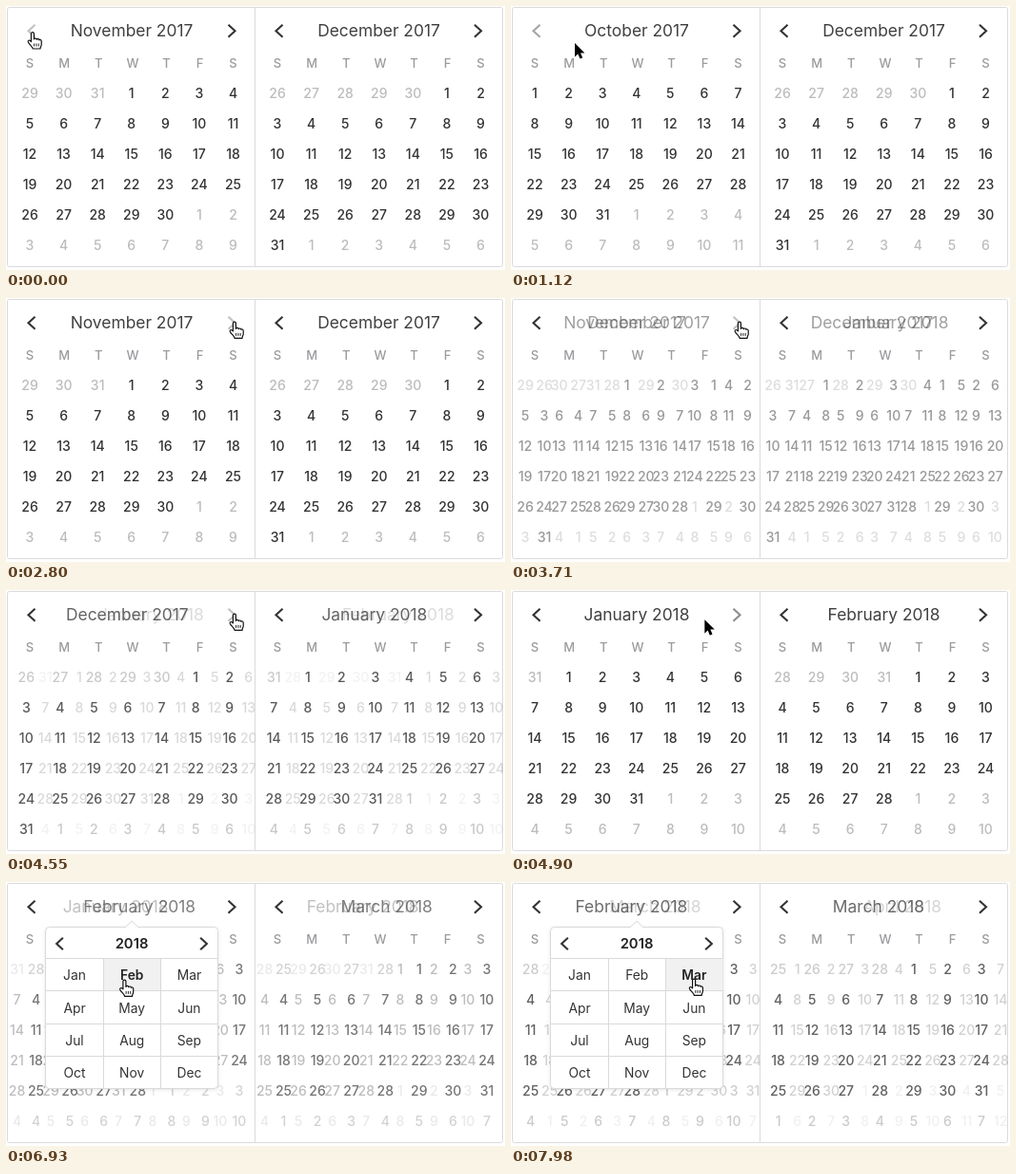
Write an HTML page with a canvas that moves like this. It is 524x278 px and loops after 8 s.

```html
<!DOCTYPE html>
<html lang="en">
<head>
<meta charset="utf-8">
<title>Calendar</title>
<style>
html, body { margin: 0; width: 100%; height: 100%; overflow: hidden; background: #fff; }
canvas { display: block; width: 524px; height: 278px; }
</style>
</head>
<body>
<canvas id="stage"></canvas>
<script>
const W = 524, H = 278, LOOP = 8000, STEP = 70, SLIDE = 360, COL = 35.58;
const INK = '#333', FADED = '#bcbcbc', LINE = '#dadada';
const MONTHS = ['January', 'February', 'March', 'April', 'May', 'June', 'July',
  'August', 'September', 'October', 'November', 'December'];
const PANES = [
  { x: 1, right: 261.5, first: 25, title: 132, prev: 27, next: 237 },
  { x: 262.5, right: 522, first: 285, title: 391.5, prev: 287, next: 495.5 }
];

// Months count from January 2017.
const START = [10, 11];
const SLIDES = [
  { at: 590, months: [9, 11], dir: -1 },
  { at: 2315, months: [10, 11], dir: 1 },
  { at: 3530, months: [11, 12], dir: 1 },
  { at: 4440, months: [12, 13], dir: 1 },
  { at: 6715, months: [13, 14], dir: 1 },
  { at: 7860, months: [14, 15], dir: 1 }
];
const CLICKS = [[490, 630], [2170, 2240], [3290, 3360], [4200, 4340], [6510, 6580], [7630, 7700]];
const POINTER = [
  [0, 28, 28], [980, 28, 28], [1120, 67, 39], [1400, 157, 45], [1700, 222, 34], [1960, 240, 25.4],
  [4760, 240, 25.4], [4970, 185, 34], [5180, 136, 31], [5630, 136, 31], [5950, 132, 62],
  [6300, 124.5, 103.4], [7000, 124.5, 103.4], [7120, 134, 104], [7370, 184, 103.5], [7490, 192.2, 102.4]
];

const HAND = new Path2D('M-1.6 9.5V1.2a1.5 1.5 0 0 1 3 0V7c.2-1.3 2.8-1.3 2.9.3c.4-1.1 2.5-.9 2.6.6' +
  'c.5-.8 2.3-.5 2.3 1.2V12.5c0 1.5-1.2 2.5-1.2 4.5H.2c0-1.6-3.9-4.8-4.9-7c-.7-1.7 1.2-2.4 2.1-1.4z');
const CREASES = new Path2D('M1.6 11.5v3M3.9 11.5v3M6.2 11.5v3');
const ARROW = new Path2D('M0 0V14.5L3.3 11.4L5.5 16.6L8.2 15.4L6 10.4H10.4Z');

const canvas = document.getElementById('stage');
const ctx = canvas.getContext('2d');
const ratio = window.devicePixelRatio || 1;
canvas.width = W * ratio;
canvas.height = H * ratio;

const ramp = (t, from, to) => Math.min(1, Math.max(0, (t - from) / (to - from)));
const ease = p => p < .5 ? 2 * p * p : 1 - 2 * (1 - p) * (1 - p);

function text(str, x, y, size, weight, color) {
  ctx.font = `${weight} ${size}px Inter, "Open Sans", sans-serif`;
  ctx.textAlign = 'center';
  ctx.fillStyle = color;
  ctx.fillText(str, x, y + size * .364);
}

function line(x1, y1, x2, y2) {
  ctx.beginPath();
  ctx.moveTo(x1, y1);
  ctx.lineTo(x2, y2);
  ctx.strokeStyle = LINE;
  ctx.lineWidth = 1;
  ctx.stroke();
}

function chevron(x, y, dir, alpha = 1, size = 6.5) {
  const w = size * .54 * dir;
  ctx.save();
  ctx.globalAlpha *= alpha;
  ctx.beginPath();
  ctx.moveTo(x - w, y - size);
  ctx.lineTo(x + w, y);
  ctx.lineTo(x - w, y + size);
  ctx.strokeStyle = INK;
  ctx.lineWidth = 2.1;
  ctx.stroke();
  ctx.restore();
}

function month(pane, index, shift, alpha) {
  const year = 2017 + Math.floor(index / 12), m = index % 12;
  const lead = new Date(year, m, 1).getDay();
  ctx.save();
  ctx.globalAlpha = alpha;
  text(`${MONTHS[m]} ${year}`, pane.title + shift * 25, 26, 17.4, 400, '#404040');
  for (let i = 0; i < 42; i++) {
    const day = new Date(year, m, 1 - lead + i);
    text(day.getDate(), pane.first + (i % 7) * COL + shift * 20, 91.5 + Math.floor(i / 7) * 32,
      14, 500, day.getMonth() === m ? INK : FADED);
  }
  ctx.restore();
}

// The wide M and W push the middle weekday labels slightly right of the day columns.
function weekdays(pane) {
  [...'SMTWTFS'].forEach((d, i) =>
    text(d, pane.first + i * COL + 1.3 * Math.sin(Math.PI * i / 6), 60, 13, 500, '#9b9b9f'));
}

function drawPane(side, t) {
  const pane = PANES[side];
  let from = START[side], to = from, p = 1, dir = 1;
  for (const slide of SLIDES) {
    if (t < slide.at) break;
    from = to;
    to = slide.months[side];
    dir = slide.dir;
    p = ease(ramp(t, slide.at, slide.at + SLIDE));
  }
  ctx.save();
  ctx.beginPath();
  ctx.rect(pane.x, 1, pane.right - pane.x, 273);
  ctx.clip();
  if (from === to || p === 1) {
    month(pane, to, 0, 1);
  } else {
    month(pane, from, -dir * p, 1 - p);
    month(pane, to, dir * (1 - p), p);
  }
  weekdays(pane);
  const prevHover = side ? 0 : 1 - ramp(t, 1060, 1360);
  const nextHover = side ? 0 : ramp(t, 1750, 1960) - ramp(t, 4790, 5090);
  chevron(pane.prev, 26.3, -1, 1 - .7 * prevHover);
  chevron(pane.next, 26.3, 1, 1 - .7 * nextHover);
  ctx.restore();
}

function popover(t) {
  const alpha = ramp(t, 5270, 5460);
  if (!alpha) return;
  const selected = t < SLIDES[4].at ? 0 : t < SLIDES[5].at ? 1 : 2;
  const cols = [41.5, 102.5, 162.5, 222.5], rows = [80.5, 114.5, 149.5, 183.5, 217.5];
  ctx.save();
  ctx.globalAlpha = alpha;
  ctx.beginPath();
  ctx.roundRect(41.5, 47.5, 181, 170, 4);
  ctx.save();
  ctx.shadowColor = 'rgba(0,0,0,.12)';
  ctx.shadowBlur = 4 * ratio;
  ctx.shadowOffsetY = ratio;
  ctx.fillStyle = '#fff';
  ctx.fill();
  ctx.restore();
  ctx.strokeStyle = LINE;
  ctx.lineWidth = 1;
  ctx.stroke();
  ctx.beginPath();
  ctx.moveTo(124.5, 48.2);
  ctx.lineTo(132, 41);
  ctx.lineTo(139.5, 48.2);
  ctx.fillStyle = '#fff';
  ctx.fill();
  ctx.stroke();

  chevron(56.5, 65, -1, 1, 6.2);
  chevron(207.5, 65, 1, 1, 6.2);
  text('2018', 132, 65, 14.8, 600, '#222');
  ctx.fillStyle = '#f1f1f1';
  ctx.fillRect(cols[selected], rows[0], cols[selected + 1] - cols[selected], rows[1] - rows[0]);
  rows.slice(0, 4).forEach(y => line(41.5, y, 222.5, y));
  cols.slice(1, 3).forEach(x => line(x, 80.5, x, 217.5));
  MONTHS.forEach((name, i) => text(name.slice(0, 3), 72 + (i % 3) * 60.2, 98.3 + Math.floor(i / 3) * 34.2,
    13.8, i === selected ? 600 : 400, i === selected ? '#222' : INK));
  ctx.restore();
}

function pointerAt(t) {
  const i = POINTER.findIndex(k => k[0] > t);
  if (i < 0) return POINTER[POINTER.length - 1].slice(1);
  const [t0, x0, y0] = POINTER[i - 1], [t1, x1, y1] = POINTER[i];
  const p = ramp(t, t0, t1);
  return [x0 + (x1 - x0) * p, y0 + (y1 - y0) * p];
}

function pointer(t) {
  const isArrow = (t >= 1050 && t < 1800) || (t > 4790 && t < 5040);
  ctx.save();
  ctx.translate(...pointerAt(t));
  ctx.lineJoin = 'round';
  if (CLICKS.some(([down, up]) => t >= down && t < up)) {
    ctx.beginPath();
    ctx.arc(0, 0, 30.5, 0, Math.PI * 2);
    ctx.strokeStyle = 'rgba(0,0,0,.5)';
    ctx.lineWidth = 2;
    ctx.stroke();
  }
  if (isArrow) {
    ctx.strokeStyle = '#fff';
    ctx.lineWidth = 2;
    ctx.stroke(ARROW);
    ctx.fillStyle = '#000';
    ctx.fill(ARROW);
  } else {
    ctx.fillStyle = '#fff';
    ctx.fill(HAND);
    ctx.strokeStyle = '#111';
    ctx.lineWidth = 1.2;
    ctx.stroke(HAND);
    ctx.lineWidth = .9;
    ctx.stroke(CREASES);
  }
  ctx.restore();
}

function draw(t) {
  ctx.setTransform(ratio, 0, 0, ratio, 0, 0);
  ctx.fillStyle = '#fff';
  ctx.fillRect(0, 0, W, H);
  ctx.beginPath();
  ctx.roundRect(1.5, 1.5, 520, 273, 2);
  ctx.strokeStyle = LINE;
  ctx.lineWidth = 1;
  ctx.stroke();
  line(261.5, 1.5, 261.5, 274.5);
  drawPane(0, t);
  drawPane(1, t);
  popover(t);
  pointer(t);
}

const begin = performance.now();
function frame() {
  const t = (performance.now() - begin) % LOOP;
  draw(Math.floor(t / STEP) * STEP);
  requestAnimationFrame(frame);
}
frame();
</script>
</body>
</html>
```
